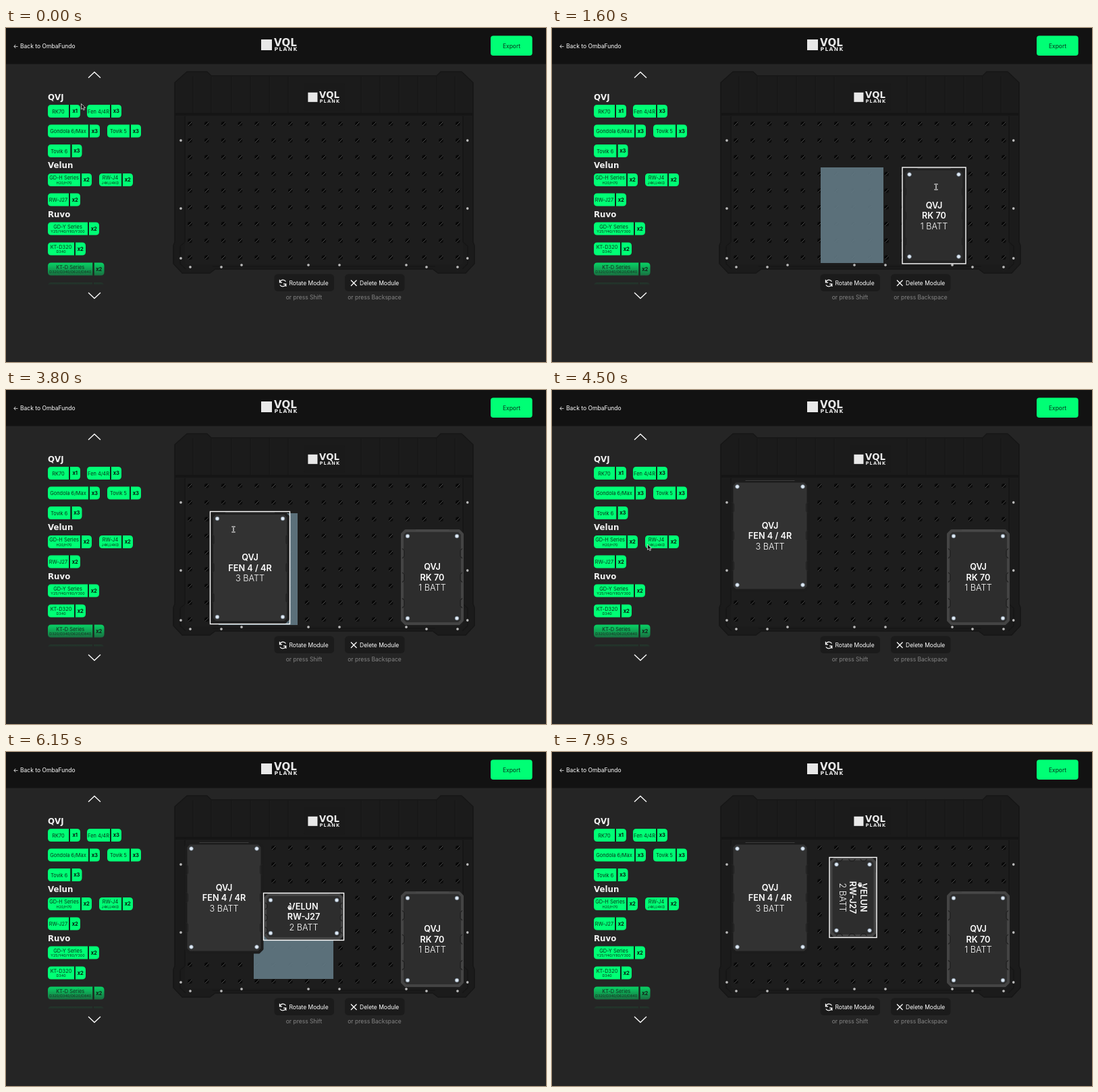
Animation, 800 px wide and 496 px high, one loop 8000 ms. Source, as an HTML page:

```html
<!DOCTYPE html>
<html lang="en">
<head>
<meta charset="utf-8">
<title>Board builder</title>
<style>
html, body { margin: 0; width: 100%; height: 100%; overflow: hidden; background: #252525; }
svg { display: block; width: 800px; height: 496px; font-family: Inter, "Open Sans", sans-serif; }
.mid { text-anchor: middle; }
.ui { font-size: 8.5px; fill: #fff; }
.hint { font-size: 8.5px; fill: #858585; text-anchor: middle; }
.head { font: bold 11.8px "DejaVu Sans", sans-serif; fill: #f0f0f0; }
.chip { font-size: 7.4px; fill: #06331b; text-anchor: middle; }
.chip .sub { font-size: 5.4px; }
.chip .count { font-size: 7.6px; font-weight: 700; fill: #04190d; }
.word { font: bold 15px "DejaVu Sans", sans-serif; fill: #e8e8e8; }
.small { font-size: 7.5px; letter-spacing: 1.4px; }
.label { font-size: 12.7px; font-weight: 600; fill: #fff; text-anchor: middle; }
.label .light { font-weight: 300; }
</style>
</head>
<body>
<svg id="stage" viewBox="0 0 800 496"></svg>
<script>
const GREEN = '#00ff75';
const stage = document.getElementById('stage');
const range = n => [...Array(n).keys()];
const text = (x, y, cls, value) => `<text x="${x}" y="${y}" class="${cls}">${value}</text>`;
const rect = (x, y, w, h, fill, more = '') =>
  `<rect x="${x}" y="${y}" width="${w}" height="${h}" fill="${fill}" ${more}/>`;
const line = (d, color, width = 1) =>
  `<path d="${d}" fill="none" stroke="${color}" stroke-width="${width}"/>`;

// x, y, width of the name part, count, name, second line
const chips = {
  rk: [62, 114, 31, 1, 'RK70'],
  fen: [120, 114, 34, 3, 'Fen 4/4R'],
  gondola: [62, 143.5, 60, 3, 'Gondola 6/Max'],
  tovik5: [150, 143.5, 33, 3, 'Tovik 5'],
  tovik6: [62, 173, 33.5, 3, 'Tovik 6'],
  gdh: [62, 216, 48, 2, 'GD-H Series', 'H20/H70'],
  rw4: [138, 216, 33, 2, 'RW-J4', 'J4K/J4KD'],
  rw27: [62, 245.5, 31, 2, 'RW-J27'],
  gdy: [62, 288.5, 59, 2, 'GD-Y Series', 'Y25/Y40/Y80/Y300'],
  ktd: [62, 318.5, 39, 2, 'KT-D320', 'D340'],
  ktds: [62, 348.5, 66.5, 2, 'KT-D Series', 'D320/D340/D620/D840'],
  next: [62, 378, 66, 2, '']
};

function chip([x, y, w, count, name, sub]) {
  const c = x + w / 2;
  return `<g class="chip">
    <path d="M${x + w} ${y}h-${w - 5}q-5 0-5 5v9q0 5 5 5h${w - 5}z" fill="${GREEN}"/>
    <path d="M${x + w + 2} ${y}h10q5 0 5 5v9q0 5-5 5h-10z" fill="${GREEN}"/>
    ${rect(x + w, y, 2, 19, '#10271a')}
    ${text(c, y + (sub ? 9 : 12.6), '', name)}
    ${sub ? text(c, y + 15.8, 'sub', sub) : ''}
    ${text(x + w + 9.3, y + 12.4, 'count', 'x' + count)}</g>`;
}

const logo = (x, y, scale) => `<g transform="translate(${x} ${y}) scale(${scale})">
  ${rect(1, 2, 16, 16, '#e8e8e8')}
  ${text(20, 11.5, 'word', 'VQL')}${text(20.5, 19, 'word small', 'PLANK')}</g>`;

function board() {
  const outline = 'M250 81L268 65H298L304 71H638L644 65H675L692 81V318L694 323V350L681 364H640L632 358H310L302 364H261L248 350V323L250 318Z';
  const ribs = [277, 304, 334, 362, 390, 418, 526, 554, 582, 610, 638, 665]
    .map(x => line(`M${x} 72V127`, '#171717', 1.4) + line(`M${x + 1.5} 72V127`, '#212121', .6)).join('');
  const holes = range(17 * 9).map(i => {
    const x = 272.5 + i % 17 * 24.8, y = 142.3 + Math.floor(i / 17) * 24.8;
    return `<g transform="translate(${x} ${y})"><circle r="3.3" fill="#0c0c0c"/>
      ${line('M-2.4 2.6L2.6-2.4', '#646464', .9)}${line('M-2.6 1.2L1.2-2.6', '#000', 1.3)}</g>`;
  }).join('');
  const side = [167, 268, 342].flatMap(y => [[259, y], [683.7, y]]);
  const low = [[273, 355], [319, 355], [349, 352], [448, 352]].flatMap(([x, y]) => [[x, y], [942 - x, y]]);
  const screws = [...side, ...low]
    .map(([x, y]) => `<circle cx="${x}" cy="${y}" r="2.3" fill="#bdbdbd" stroke="#0e0e0e" stroke-width=".8"/>`).join('');
  return `<path d="${outline}" fill="#1b1b1b" stroke="#161616" stroke-width="1.5"/>
    ${ribs}${rect(441, 81, 61, 43, '#1a1a1a', 'rx="4"')}
    ${rect(251, 126, 440, 4, '#151515')}${rect(265, 131, 412, 220, '#1d1d1d', 'rx="4"')}
    ${line('M265 131V318L258 324V350L266 358M677 131V318L684 324V350L676 358M306 354H636', '#151515', 1.2)}
    ${holes}${screws}${logo(446.5, 94, .88)}`;
}

const button = (x, label, icon) =>
  rect(x, 365.5, 88.5, 25.5, '#1b1b1b', 'rx="5"') + icon + text(x + 22, 382, 'ui', label);

const page = `<defs><linearGradient id="fade" x1="0" y1="0" x2="0" y2="1">
    <stop stop-color="#252525" stop-opacity="0"/><stop offset="1" stop-color="#252525"/></linearGradient>
    <clipPath id="sliver">${rect(60, 270, 60, 7.5, '#fff')}</clipPath></defs>
  ${rect(0, 0, 800, 496, '#252525')}${rect(0, 0, 800, 53.5, '#121212')}
  ${text(10.5, 29.5, 'ui', '← Back to OmbaFundo')}${logo(377, 15, 1)}
  ${rect(718, 11.6, 61.7, 29.3, GREEN, 'rx="4"')}
  <text x="749" y="29.5" class="ui mid" style="fill:#06331b">Export</text>
  ${line('M122 74L131 65.5L140 74', '#fff', 1.3)}
  ${text(62, 106.5, 'head', 'QVJ')}${text(62, 208, 'head', 'Velun')}${text(62, 280.7, 'head', 'Ruvo')}
  ${Object.values(chips).map(chip).join('')}
  ${rect(55, 340, 160, 42, 'url(#fade)')}${rect(55, 382, 160, 20, '#252525')}
  ${line('M122 393L131 401.5L140 393', '#fff', 1.3)}
  ${board()}
  ${button(397.5, 'Rotate Module', line('M405.5 377.5A5 5 0 0 1 414.5 376.5M414.7 380.5A5 5 0 0 1 405.8 381.5M405.4 373.8V377.8H409M414.8 384V380.2H411', '#fff', 1.2))}
  ${button(502, 'Delete Module', line('M511 374.5L519.5 383M519.5 374.5L511 383', '#fff', 1.3))}
  ${text(441.5, 403, 'hint', 'or press Shift')}${text(546, 403, 'hint', 'or press Backspace')}`;

const modules = [
  { chip: 'rk', w: 93, h: 142, lines: ['QVJ', 'RK 70', '1 BATT'], fill: '#2d2d2d', edge: '#444', dragEdge: '#222',
    start: [398, 207], end: [585, 207], hold: [49.5, 28.5],
    take: 500, hover: 1050, drop: 1250, grab: 1350, release: 1850, ghostEnd: 1850 },
  { chip: 'fen', w: 117, h: 166, lines: ['QVJ', 'FEN 4 / 4R', '3 BATT'], fill: '#323232', edge: '#1c1c1c', dragEdge: '#1e1e1e',
    start: [315, 183], end: [264.5, 133.5], hold: [34, 26],
    take: 2500, hover: 3100, drop: 3350, grab: 3600, release: 4150, ghostEnd: 4150 },
  { chip: 'rw27', w: 118, h: 69, lines: ['VELUN', 'RW-J27', '2 BATT'], fill: '#2d2d2d', edge: '#444', dragEdge: '#444',
    start: [367, 268], hold: [37, 20], turnedHold: [43.5, 39],
    take: 4800, hover: 5300, drop: 5600, grab: 5850, release: 9000, ghostEnd: 6350, turn: 7050 }
];

function moduleArt({ w, h, lines, fill, edge }) {
  const notch = x => [.2, .45, .72].map(k =>
    `M${x} ${h * k}l${x < 9 ? 3 : -3} 3v${h * .06}l${x < 9 ? -3 : 3} 3`).join('');
  const pins = [[10, 10], [w - 10, 10], [10, h - 10], [w - 10, h - 10]]
    .map(([x, y]) => `<circle cx="${x}" cy="${y}" r="2.8" fill="#dfeaf5" stroke="#7d8b99" stroke-width=".8"/>`).join('');
  return `<path class="edge" d="M7 2H${w - 7}L${w - 2} 7V${h - 7}L${w - 7} ${h - 2}H7L2 ${h - 7}V7Z"
      fill="${fill}" stroke="${edge}" stroke-width="4" stroke-linejoin="round"/>
    ${line(notch(2) + notch(w - 2), '#232323', 1.3)}
    ${line(`M22 1H${w - 22}`, '#555', .6)}${pins}
    <g class="label">${lines.map((s, i) => text(w / 2, h / 2 - 11 + i * 15.6, i > 1 ? 'light' : '', s)).join('')}</g>
    <rect class="ring" x="-.5" y="-.5" width="${w + 1}" height="${h + 1}" fill="none" stroke="#fff" stroke-width="1.4"/>`;
}

const cursors = {
  arrow: '<path d="M0 0V8.2L2 6.5L3.4 9.5L4.9 8.8L3.5 5.9H6Z" fill="#111" stroke="#ddd" stroke-width=".8"/>',
  beam: line('M-2.5-4H2.5M0-4V4M-2.5 4H2.5', '#eee', 2) + line('M-2.5-4H2.5M0-4V4M-2.5 4H2.5', '#333', .8),
  hand: '<path d="M-2.5 1L-1-2L1-3L4-2L5 1L3.5 5H-.5Z" fill="#fff" stroke="#111" stroke-width=".9"/>'
    + line('M0-1V1M1.7-1.5V.7M3.3-1V1', '#111', .6)
};

stage.innerHTML = page
  + modules.map(m => rect(...m.start, m.w, m.h, '#617883', 'class="ghost" opacity=".92"')).join('')
  + modules.map(m => `<g class="module">${moduleArt(m)}</g>`).join('')
  + modules.map(m => `<g class="drag" opacity=".96">${chip(chips[m.chip])}${
    m.chip === 'rw27' ? `<g clip-path="url(#sliver)">${text(62, 280.7, 'head', 'Ruvo')}</g>` : ''}</g>`).join('')
  + Object.values(cursors).map(art => `<g class="cursor">${art}</g>`).join('');

const all = cls => [...stage.querySelectorAll('.' + cls)];
const ghosts = all('ghost'), bodies = all('module'), drags = all('drag'), pointers = all('cursor');
const rings = all('ring'), edges = all('edge');

// pointer path: time, x, y
const path = [
  [0, 111.5, 112.5], [350, 87, 123], [500, 87, 123], [1250, 447.5, 235.5], [1350, 447.5, 235.5],
  [1600, 569, 236], [1800, 634.5, 235.5], [1900, 634.5, 235.5], [2150, 178, 154],
  [2400, 149, 123.5], [2500, 149, 123.5], [2900, 257, 148], [3350, 349, 209], [3600, 349, 209],
  [3800, 337, 207], [4100, 298.5, 159.5], [4200, 298.5, 159.5], [4650, 86.5, 253.5], [4800, 86.5, 253.5],
  [5550, 452.5, 263], [5800, 404, 288], [5900, 404, 288], [6400, 440, 172], [6700, 442, 173.5],
  [7050, 442, 173.5], [7950, 455, 196], [8000, 455, 196]
];

function slope(i, axis) {
  const a = path[i - 1], p = path[i], b = path[i + 1];
  if (!a || !b || (p[axis] - a[axis]) * (b[axis] - p[axis]) <= 0) return 0;
  return (b[axis] - a[axis]) / (b[0] - a[0]);
}

function pointerAt(t) {
  const i = path.findIndex((p, k) => k + 1 === path.length - 1 || t < path[k + 1][0]);
  const a = path[i], b = path[i + 1], d = b[0] - a[0], u = (t - a[0]) / d;
  return [1, 2].map(k => a[k] * (1 + 2 * u) * (1 - u) ** 2 + slope(i, k) * d * u * (1 - u) ** 2
    + b[k] * u * u * (3 - 2 * u) + slope(i + 1, k) * d * u * u * (u - 1));
}

const show = (el, on) => el.style.display = on ? '' : 'none';
const move = (el, x, y, more = '') => el.setAttribute('transform', `translate(${x} ${y})${more}`);

function draw(t) {
  const [x, y] = pointerAt(t);
  let kind = 'arrow';
  modules.forEach((m, i) => {
    const held = t >= m.grab && t < m.release, turned = t >= m.turn;
    const [hx, hy] = turned ? m.turnedHold : m.hold;
    const [mx, my] = t < m.grab ? m.start : held ? [x - hx, y - hy] : m.end;
    show(bodies[i], t >= m.drop);
    move(bodies[i], mx, my, turned ? ` translate(${m.h} 0) rotate(90)` : '');
    show(rings[i], held);
    edges[i].setAttribute('stroke', held ? m.dragEdge : m.edge);
    show(ghosts[i], t >= m.hover && t < m.ghostEnd);
    const [, px, py] = path.find(p => p[0] === m.take);
    show(drags[i], t > m.take && t < m.drop);
    move(drags[i], x - px, y - py);
    if (held) kind = m.turn ? 'hand' : 'beam';
  });
  Object.keys(cursors).forEach((name, i) => {
    show(pointers[i], name === kind);
    move(pointers[i], x, y);
  });
}

const begin = performance.now();
function tick() {
  const t = (performance.now() - begin) % 8000;
  draw(Math.floor(t / 50) * 50);
  requestAnimationFrame(tick);
}
tick();
</script>
</body>
</html>
```
